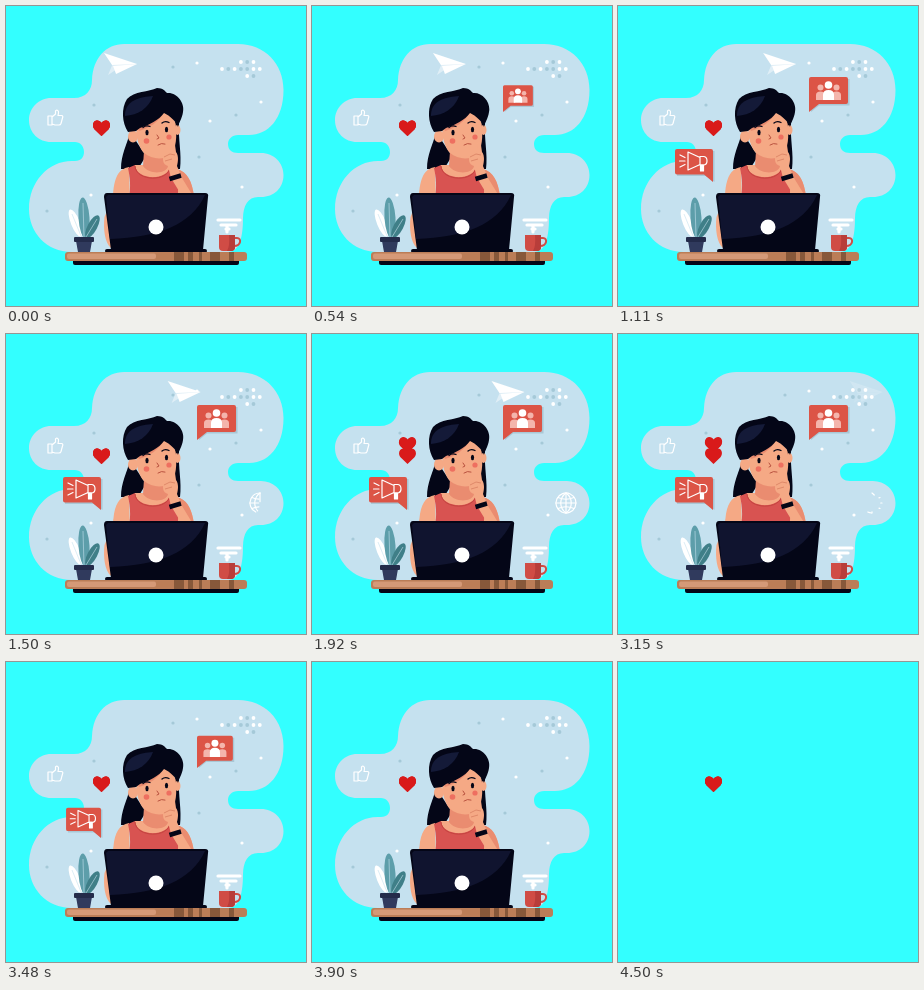
Animation, 300 px wide and 300 px high, one loop 4530 ms. Source, as an HTML page:

```html
<!DOCTYPE html>
<html lang="en">
<head>
<meta charset="utf-8">
<title>Thinking at the desk</title>
<style>
  html, body { margin: 0; height: 100%; overflow: hidden; background: #33ffff; }
  svg { display: block; width: 100%; height: 100%; }
  .line { fill: none; stroke: #fff; stroke-width: 1.2; stroke-linecap: round; stroke-linejoin: round; }
  .steam { stroke-width: 3.2; }
  .ink { fill: #040617; }
  .skin { fill: #f5a985; }
  .shade { fill: #ea8c70; }
  .red { fill: #d85351; }
  .bubble { fill: #dc5446; }
</style>
</head>
<body>
<svg viewBox="0 0 300 300">
  <defs>
    <path id="heart" fill="#d91a1a" d="M0 8L-7 1.200C-10-2.500-8-7.500-4.500-7.500C-2.500-7.500-1-6.500 0-5C1-6.500 2.500-7.500 4.500-7.500C8-7.500 10-2.500 7 1.200Z"/>
  </defs>

  <g id="scene">
    <path fill="#c5e1ef" d="M118 38H232C259 38 277.500 58 277.500 84C277.500 113 262 129 243 129H232C226 129 222 133 222 138C222 144 226 147 232 147H255C268 147 277.500 157 277.500 169C277.500 182 268 191 255 191H252C242 191 237 200 237 212C237 230 234 246 222 246H66C40 246 23 226 23 203C23 176 42 155 66 155H69C75 155 78 151 78 146C78 140 74 136 69 136H45C33 136 23 127 23 114C23 102 33 92 45 92H68C80 92 86 84 86 74C87 52 100 38 118 38Z"/>
    <g id="dots"></g>

    <!-- thumb -->
    <path class="line" d="M42 110H46V119H42ZM46 111L49.500 108V105C50 103.500 53 104 52.500 107L52 109.500H55.500C57 109.500 57 111 56.500 112L55 117.500C54.700 118.500 54 119 53 119H49L46 118"/>

    <!-- plane -->
    <g id="plane">
      <path fill="#dfeef6" d="M0 0L-24-1L-29 11L-20 5Z"/>
      <path fill="#fff" d="M-33-11L0 0L-25 1ZM0 0L-24 2L-21 10Z"/>
    </g>

    <!-- woman -->
    <path class="ink" d="M124 126C121 139 115 148 115 163H132L140 150ZM168 116H173C172 134 176 148 174 163H166Z"/>
    <path class="skin" d="M123 161C112 163 108 172 107 190L98.500 211C97 223 99 237 105 242L124 196ZM129 159H164L170 163C181 165 186 175 188 190H124Z"/>
    <path class="shade" d="M138 145H162V160C161 168 143 169 137 160ZM171 163C182 166 186 176 188 190H182Z"/>
    <path class="red" d="M122 162L129 159C130 175 163 175 164 160L170 163C173 173 172 181 172 192H123C125 181 124 171 122 162Z"/>
    <path fill="none" stroke="#c4433f" d="M129 160C130 176 163 176 164 161"/>
    <ellipse class="skin" cx="127" cy="130.500" rx="5" ry="6"/>
    <ellipse class="skin" cx="171.500" cy="124" rx="3" ry="5"/>
    <path class="skin" d="M130 118C134 110 150 104 158 105C166 108 170 114 170 122C171 136 169 145 163 150C156 154 145 153 138 147C133 142 130 132 130 118Z"/>
    <path class="shade" d="M158 106C153 116 143 122 133 125L131 119Z"/>
    <g fill="#ee6f60"><circle cx="140.500" cy="135" r="2.800"/><circle cx="163" cy="131" r="2.600"/></g>
    <g class="ink"><ellipse cx="141" cy="126.500" rx="1.600" ry="2.800"/><ellipse cx="160.500" cy="123.500" rx="1.600" ry="2.800"/></g>
    <path fill="none" stroke="#040617" stroke-width="1.300" stroke-linecap="round" d="M137 121.500Q140 119 144 120.500M156 117Q159 114.500 163 116.500"/>
    <path fill="none" stroke="#b9523f" stroke-linecap="round" d="M152 139Q155.500 136.500 159 138M151 129L153 132L151 133"/>
    <path class="ink" d="M122 126C116 117 115 102 121 93C128 85 143 86 151 82C157 82 159 85 161 87C171 86 179 97 177 106C176 113 173 116 172 121C170 115 164 110 158 107C153 114 143 119 134 122L130 125Z"/>
    <path fill="#141a38" d="M119 108C120 94 134 91 147 90C143 102 132 109 119 110Z"/>
    <path class="skin" d="M157 153C157 148 162 147 165 145L165.500 138C166 136 168.500 136 169 139L170 146C173 150 172 156 171 160L176 172L187 190H176L165 172L162 160C159 159 157 157 157 153Z"/>
    <path fill="none" stroke="#d98063" stroke-width=".8" d="M158 151L164 148L169 149M159 155L166 153"/>
    <path fill="none" stroke="#040617" stroke-width="4.500" d="M163.500 173L175 169.500"/>

    <!-- laptop -->
    <path class="ink" d="M101 187H199Q203 187 202 191L197 244H105L98 191Q98 187 101 187Z"/>
    <path fill="#10142f" d="M102 189H199C185 219 153 231 104 233L100 191Z"/>
    <rect x="99" y="243" width="102" height="4" rx="2" class="ink"/>
    <circle cx="150" cy="221" r="7.500" fill="#fff"/>

    <!-- plant -->
    <ellipse cx="69.500" cy="217" rx="4.500" ry="14.500" fill="#fff" transform="rotate(-22 69.500 217)"/>
    <ellipse cx="78" cy="212" rx="5.500" ry="20.500" fill="#5d9eaa" transform="rotate(-4 78 212)"/>
    <ellipse cx="86.500" cy="220.500" rx="4.800" ry="12.500" fill="#3f7f88" transform="rotate(28 86.500 220.500)"/>
    <path fill="none" stroke="#c5e1ef" stroke-width=".6" d="M78 231L77 197M75 230L66 208M80 231L91 213"/>
    <path fill="#303a5d" d="M70 235H86L84 246H72Z"/>
    <rect x="68" y="231" width="20" height="5" rx="1" fill="#232b4a"/>

    <!-- cup -->
    <path fill="none" stroke="#d04c45" stroke-width="2" d="M228 232H231C236 232 235 240 228 240"/>
    <path fill="#d04c45" d="M213 229H229V241Q229 245 225 245H217Q213 245 213 241Z"/>
    <path fill="#b83d3a" d="M223 229H229V241Q229 245 225 245H221Q224 240 223 229Z"/>
    <path class="line steam" d="M212 214H234M215 219H230M220 223H223M221 220V226"/>

    <!-- desk -->
    <rect x="67" y="253" width="166" height="6" rx="2" class="ink"/>
    <rect x="59" y="246" width="182" height="9" rx="3" fill="#bb7d57"/>
    <rect x="61" y="247.500" width="89" height="5.500" rx="2" fill="#d59977"/>
    <path fill="#87583a" d="M168 246H178V255H168ZM182 246H187V255H182ZM193 246H196V255H193ZM204 246H214V255H204ZM223 246H228V255H223Z"/>

    <!-- people bubble -->
    <g id="people">
      <path fill="#9fbccb" opacity=".7" d="M193 73H231.500V99.500H201L193 106Z"/>
      <path class="bubble" d="M193 71H228Q230 71 230 73V96Q230 98 228 98H201L191 106V73Q191 71 193 71Z"/>
      <g fill="#f4b5ac">
        <circle cx="202.500" cy="81.500" r="3"/><circle cx="218.500" cy="81.500" r="3"/>
        <path d="M198 94V89Q198 85.500 202.500 85.500Q207 85.500 207 89V94ZM214 94V89Q214 85.500 218.500 85.500Q223 85.500 223 89V94Z"/>
      </g>
      <g fill="#fff">
        <circle cx="210.500" cy="79" r="3.800"/>
        <path d="M205 94V89Q205 84 210.500 84Q216 84 216 89V94Z"/>
      </g>
    </g>

    <!-- megaphone bubble -->
    <g id="news">
      <path fill="#9fbccb" opacity=".7" d="M59 145H96.500V176L88 170H59Z"/>
      <path class="bubble" d="M59 143H93Q95 143 95 145V176L86 168.500H59Q57 168.500 57 166.500V145Q57 143 59 143Z"/>
      <path class="line" d="M70 146V164L82 158.500V151.500ZM82 150.500H86Q89 151 89 155Q89 158.500 86 159H82ZM62 149L67 151.500M61.500 155H67M62 161L67 158.500"/>
      <path class="line" style="fill:#fff" d="M82.500 159V165H85.500V159Z"/>
    </g>

    <!-- globe -->
    <g id="globe" class="line">
      <circle pathLength="1" cx="254" cy="169" r="10" transform="rotate(115 254 169)"/>
      <path pathLength="1" d="M254 159C247 164 247 174 254 179C261 174 261 164 254 159"/>
      <path pathLength="1" d="M254 159V179"/>
      <path pathLength="1" d="M244 169H264"/>
      <path pathLength="1" d="M246 163.500Q254 167 262 163.500"/>
      <path pathLength="1" d="M246 174.500Q254 171 262 174.500"/>
    </g>
  </g>

  <use id="left" href="#heart"/>
  <use id="right" href="#heart"/>
  <use href="#heart" x="95.500" y="122"/>
</svg>

<script>
const LOOP = 4530;
const $ = id => document.getElementById(id);
const ramp = (t, from, to) => Math.min(1, Math.max(0, (t - from) / (to - from)));
const smooth = p => p * p * (3 - 2 * p);
const backOut = p => 1 + 2.2 * (p - 1) ** 3 + 1.2 * (p - 1) ** 2;

const WHITE = '#fff', PALE = '#a5c9d8';
const dot = (x, y, r, fill) => `<circle cx="${x}" cy="${y}" r="${r}" fill="${fill}"/>`;
let dots = '';
for (const [x, y] of [[191, 57], [255, 96], [204, 115], [236, 181], [85, 189]]) dots += dot(x, y, 1.6, WHITE);
for (const [x, y] of [[167, 61], [88, 99], [230, 109], [193, 151], [41, 205]]) dots += dot(x, y, 1.6, PALE);
for (const [y, first, row] of [[56, 3, 'wpw'], [63, 0, 'wpwppww'], [70, 4, 'wp']])
  [...row].forEach((tone, i) => {
    dots += dot(216 + (first + i) * 6.3, y, 1.9, tone === 'w' ? WHITE : PALE);
  });
$('dots').innerHTML = dots;

function pop(id, x, y, t, start) {
  const scale = backOut(ramp(t, start, start + 350)) * (1 - smooth(ramp(t, 3420, 3770)));
  $(id).setAttribute('transform', `translate(${x} ${y}) scale(${scale}) translate(${-x} ${-y})`);
}

function trimGlobe(t) {
  const head = smooth(ramp(t, 1250, 1800));
  const tail = smooth(ramp(t, 2600, 3250));
  const globe = $('globe');
  globe.style.display = head > tail ? '' : 'none';
  globe.setAttribute('stroke-dasharray', `${head - tail} 2`);
  globe.setAttribute('stroke-dashoffset', -tail);
}

// Rise straight up, then fan out, and come back the same way.
function flyHeart(id, dx, dy, t) {
  const there = 1 - Math.abs(ramp(t, 1780, 3290) * 2 - 1);
  const p = Math.sin(there * Math.PI / 2);
  $(id).setAttribute('transform', `translate(${95.5 + dx * p ** 4} ${122 + dy * p})`);
}

function draw() {
  const t = performance.now() % LOOP;
  $('scene').style.display = t < 4500 ? '' : 'none';
  $('plane').setAttribute('transform', `translate(${131 + t * 0.0424} 58)`);
  $('plane').setAttribute('opacity', 1 - ramp(t, 2750, 3250));
  pop('people', 191, 106, t, 450);
  pop('news', 95, 176, t, 600);
  trimGlobe(t);
  flyHeart('left', -22, -38, t);
  flyHeart('right', 29, -40, t);
  requestAnimationFrame(draw);
}
draw();
</script>
</body>
</html>
```
